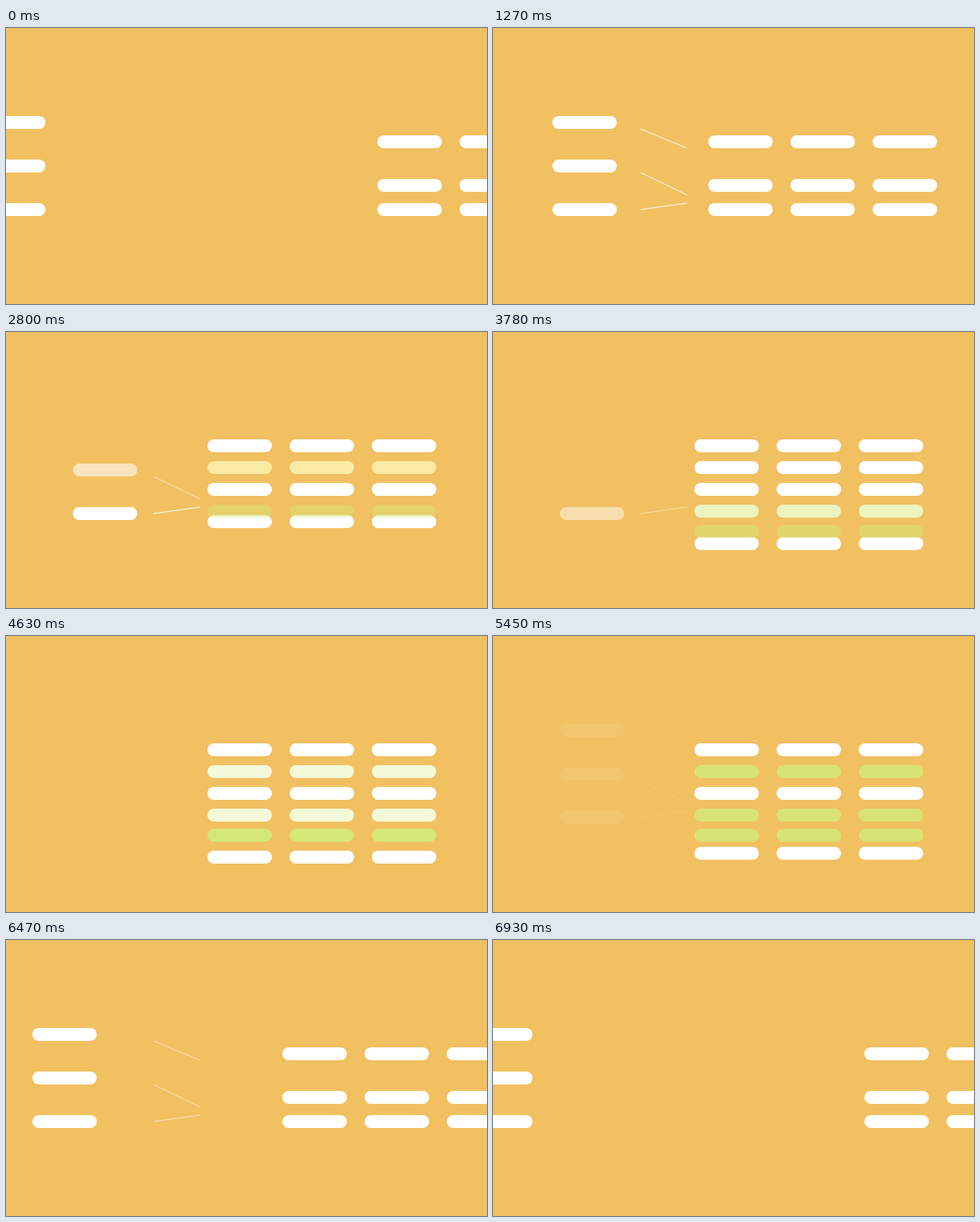
Recreate the animation shown at these times as an HTML page with a canvas. Size 597 by 342 pixels, loop 7.31 s.

```html
<!DOCTYPE html>
<html lang="en">
<head>
<meta charset="utf-8">
<title>Rows moving between lists</title>
<style>
  html, body { margin: 0; width: 100%; height: 100%; overflow: hidden; background: #f1c061; }
  canvas { display: block; }
</style>
</head>
<body>
<canvas id="stage" width="597" height="342"></canvas>
<script>
const ctx = document.getElementById('stage').getContext('2d');
const LOOP = 7310, STEP = 600;
const BG = '#f1c061';
const WHITE = [255, 255, 255], GREEN = [212, 232, 120], YELLOW = [245, 220, 98];

// Start of each step, in ms
const START = { open: 878, first: 1765, second: 2648, third: 3596, mark: 4515, undo: 5390, close: 6312 };

const LINKS = [[125, 149], [179, 207], [225, 217]];
const LEFT_ROWS = [109, 163, 217];

// cubic-bezier(.25, .1, .25, 1)
function ease(x) {
  if (x <= 0) return 0;
  if (x >= 1) return 1;
  const curve = (u, a, b) => 3 * a * u * (1 - u) ** 2 + 3 * b * u * u * (1 - u) + u ** 3;
  let lo = 0, hi = 1;
  for (let i = 0; i < 24; i++) {
    const mid = (lo + hi) / 2;
    if (curve(mid, 0.25, 0.25) < x) lo = mid; else hi = mid;
  }
  return curve(lo, 0.1, 1);
}

const lerp = (a, b, p) => a + (b - a) * p;
const mix = (a, b, p) => a.map((v, i) => lerp(v, b[i], p));

function pill(x, y, color, alpha) {
  if (alpha <= 0) return;
  ctx.globalAlpha = alpha;
  ctx.fillStyle = `rgb(${color.map(Math.round).join(',')})`;
  ctx.beginPath();
  ctx.roundRect(x, y, 80, 16, 8);
  ctx.fill();
}

function row(x, y, color = WHITE, alpha = 1) {
  for (let i = 0; i < 3; i++) pill(x + 102 * i, y, color, alpha);
}

function link(y1, y2, alpha) {
  if (alpha <= 0) return;
  ctx.globalAlpha = alpha;
  ctx.strokeStyle = '#fff';
  ctx.lineWidth = 1;
  ctx.beginPath();
  ctx.moveTo(183, y1);
  ctx.lineTo(241, y2);
  ctx.stroke();
}

function draw(t) {
  const p = {};
  for (const name in START) p[name] = ease((t - START[name]) / STEP);

  ctx.globalAlpha = 1;
  ctx.fillStyle = BG;
  ctx.fillRect(0, 0, 597, 342);

  const shown = p.open * (1 - p.close);
  const leftX = lerp(-31, 83, shown);
  const rightX = lerp(461, 250, shown);
  const moved = [p.first, p.second, p.third];

  LEFT_ROWS.forEach((y, i) => {
    const alpha = 1 - moved[i] * (1 - p.undo);
    pill(leftX, y, WHITE, alpha);
    link(...LINKS[i], alpha * shown);
  });

  const drop = (24 * p.second + 25 * p.third) * (1 - p.undo);
  row(rightX, 133);
  row(rightX, 187);
  row(rightX, 217 + drop);

  // Inserted rows settle to white, then are marked green before they leave
  const stay = 1 - p.undo;
  row(rightX, 160, mix(mix(YELLOW, WHITE, p.second), GREEN, p.mark), p.first * stay);
  row(rightX, 214, mix(mix(GREEN, WHITE, p.third), GREEN, p.mark), p.second * stay);
  row(rightX, 239, GREEN, p.third * stay);
}

function tick() {
  draw(performance.now() % LOOP);
  requestAnimationFrame(tick);
}
tick();
</script>
</body>
</html>
```
